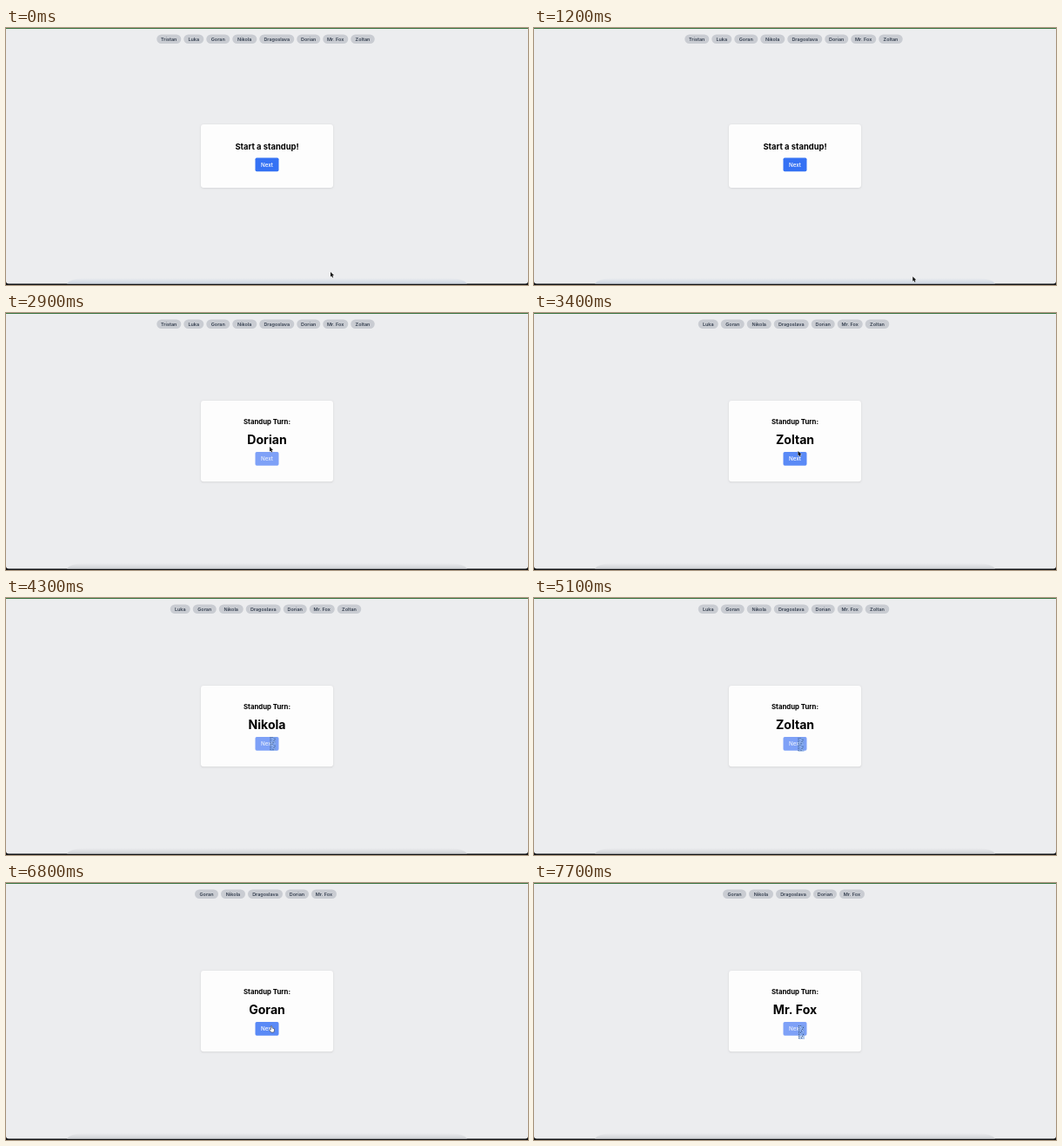
An HTML page with a canvas that plays this animation: 600 px wide and 296 px high, repeating every 8000 ms.

```html
<!DOCTYPE html>
<html lang="en">
<head>
<meta charset="utf-8">
<title>Standup picker</title>
<style>
  html, body { margin: 0; width: 100%; height: 100%; overflow: hidden; background: #ecedef; }
  canvas { display: block; }
</style>
</head>
<body>
<canvas id="stage" width="600" height="296"></canvas>
<script>
const ctx = document.getElementById('stage').getContext('2d');
const LOOP = 8000, STEP = 100;

const people = [
  { name: 'Tristan', width: 28 },
  { name: 'Luka', width: 23, leaves: 6700 },
  { name: 'Goran', width: 27 },
  { name: 'Nikola', width: 28 },
  { name: 'Dragoslava', width: 40 },
  { name: 'Dorian', width: 27 },
  { name: 'Mr. Fox', width: 29 },
  { name: 'Zoltan', width: 27.5, leaves: 5300 }
];
people[0].leaves = 3300;

// Each draw flicks through names once per step, then rests on the last one.
const draws = [
  { start: 2300, end: 3300, order: [0, 3, 5, 2, 6, 1, 5, 3, 3, 2, 7] },
  { start: 4300, end: 5300, order: [3, 4, 2, 6, 1, 5, 2, 3, 7, 3, 6] },
  { start: 5700, end: 6700, order: [2, 5, 1, 3, 6, 2, 1, 5, 3, 1, 2] },
  { start: 7200, end: 8200, order: [5, 2, 3, 5, 2, 6] }
];

const pointerPath = [
  [0, 373, 281], [900, 410, 276], [1300, 440, 288], [1800, 307, 158],
  [2000, 303, 154], [3200, 303, 154], [3400, 303.5, 159], [4300, 303.5, 160],
  [5100, 303.5, 161], [5500, 304, 164], [LOOP, 304, 164]
];

const BLUE = [53, 114, 244], PALE = [126, 161, 247];
const mix = (a, b, k) => `rgb(${a.map((v, i) => Math.round(v + (b[i] - v) * k))})`;

function box(x, y, w, h, r, fill) {
  ctx.fillStyle = fill;
  ctx.beginPath();
  ctx.roundRect(x, y, w, h, r);
  ctx.fill();
}

function label(text, x, y, size, weight, color) {
  ctx.font = `${weight} ${size}px Inter, sans-serif`;
  ctx.textAlign = 'center';
  ctx.fillStyle = color;
  ctx.fillText(text, x, y);
}

function pointerAt(t) {
  const i = pointerPath.findIndex(p => p[0] > t);
  const [t0, x0, y0] = pointerPath[i - 1], [t1, x1, y1] = pointerPath[i];
  const u = (t - t0) / (t1 - t0), k = u * u * (3 - 2 * u);
  return [x0 + (x1 - x0) * k, y0 + (y1 - y0) * k];
}

function drawPage(t) {
  ctx.fillStyle = '#111214';
  ctx.fillRect(0, 0, 600, 296);
  box(0, 0, 600, 294.6, [0, 0, 3, 3], '#ecedef');
  ctx.fillStyle = '#3a743f';
  ctx.fillRect(0, 0, 600, 1);

  const tint = t < 2300 ? '205,214,226' : '208,210,214';
  const glow = ctx.createLinearGradient(0, 288, 0, 294.5);
  glow.addColorStop(0, `rgba(${tint},0)`);
  glow.addColorStop(1, `rgba(${tint},1)`);
  ctx.fillStyle = glow;
  ctx.beginPath();
  ctx.moveTo(70, 294.5);
  ctx.quadraticCurveTo(75, 288, 90, 288);
  ctx.lineTo(510, 288);
  ctx.quadraticCurveTo(525, 288, 530, 294.5);
  ctx.fill();
}

function drawPills(t) {
  const left = people.filter(p => !(t >= p.leaves));
  const gap = 3;
  let x = 298.5 - (left.reduce((sum, p) => sum + p.width + gap, -gap)) / 2;
  for (const p of left) {
    box(x, 7.5, p.width, 10.6, 5.3, '#c9ccd2');
    label(p.name, x + p.width / 2, 14.8, 5.47, 600, '#374151');
    x += p.width + gap;
  }
}

function drawCard(t, draw) {
  const top = draw ? 101 : 111, height = draw ? 93.3 : 73;
  ctx.save();
  ctx.shadowColor = 'rgba(0,0,0,0.13)';
  ctx.shadowBlur = 2;
  ctx.shadowOffsetY = 0.6;
  box(224, top, 152, height, 3, '#fdfdfd');
  ctx.restore();

  let fade = 1;
  if (draw) {
    const tick = Math.min(Math.floor((t - draw.start) / STEP), draw.order.length - 1);
    label('Standup Turn:', 300, 128.4, 7.8, 700, '#000');
    label(people[draw.order[tick]].name, 300, 150.6, 14.1, 700, '#000');
    fade = Math.max(0, Math.min(1, (t - draw.end) / 200));
  } else {
    label('Start a standup!', 300, 139.9, 9.4, 700, '#000');
  }
  const y = draw ? 160 : 149.6;
  box(286.5, y, 27, 15.7, 1.7, mix(PALE, BLUE, fade));
  label('Next', 300, y + 10, 6.25, 500, fade < 0.5 ? '#e8effd' : '#fff');
}

function drawArrow() {
  ctx.beginPath();
  [[0, 0], [0, 5.6], [1.3, 4.5], [2.2, 6.5], [3.2, 6], [2.3, 4.1], [4, 4]]
    .forEach(([x, y]) => ctx.lineTo(x, y));
  ctx.closePath();
  ctx.strokeStyle = 'rgba(255,255,255,0.8)';
  ctx.lineWidth = 0.8;
  ctx.stroke();
  ctx.fillStyle = '#111';
  ctx.fill();
}

function drawHand() {
  ctx.beginPath();
  ctx.moveTo(0.3, 0.8);
  ctx.quadraticCurveTo(1, 0, 1.7, 0.8);
  ctx.lineTo(1.8, 3);
  ctx.lineTo(4.3, 3.7);
  ctx.quadraticCurveTo(5, 6, 3.7, 8);
  ctx.lineTo(0.7, 8);
  ctx.lineTo(-1.5, 5);
  ctx.quadraticCurveTo(-1, 4, 0.3, 5);
  ctx.closePath();
  ctx.fillStyle = '#fff';
  ctx.fill();
  ctx.strokeStyle = '#30384a';
  ctx.lineWidth = 0.6;
  ctx.stroke();
}

// Speckled strip shown while the button is disabled.
function drawBlocked() {
  ctx.fillStyle = 'rgba(116,157,218,0.55)';
  ctx.fillRect(0, 0, 7, 16);
  for (let row = 0; row < 8; row++) {
    ctx.fillStyle = 'rgba(42,65,105,0.75)';
    ctx.fillRect(0, row * 2, 1, 1);
    ctx.fillRect(2 + row * 3 % 4, row * 2, 1, 1);
    ctx.fillStyle = 'rgba(205,224,250,0.6)';
    ctx.fillRect(2 + row * 5 % 4, row * 2 + 1, 1, 1);
  }
}

function drawPointer(t, draw) {
  ctx.save();
  ctx.translate(...pointerAt(t));
  if (t < 3450) drawArrow();
  else if (t < draw.end && t >= draw.start) drawBlocked();
  else drawHand();
  ctx.restore();
}

function render(now) {
  const t = Math.floor(now % LOOP / STEP) * STEP;
  const draw = draws.filter(d => d.start <= t).pop();
  drawPage(t);
  drawPills(t);
  drawCard(t, draw);
  drawPointer(t, draw);
  requestAnimationFrame(() => render(performance.now() - begin));
}

const begin = performance.now();
render(0);
</script>
</body>
</html>
```
